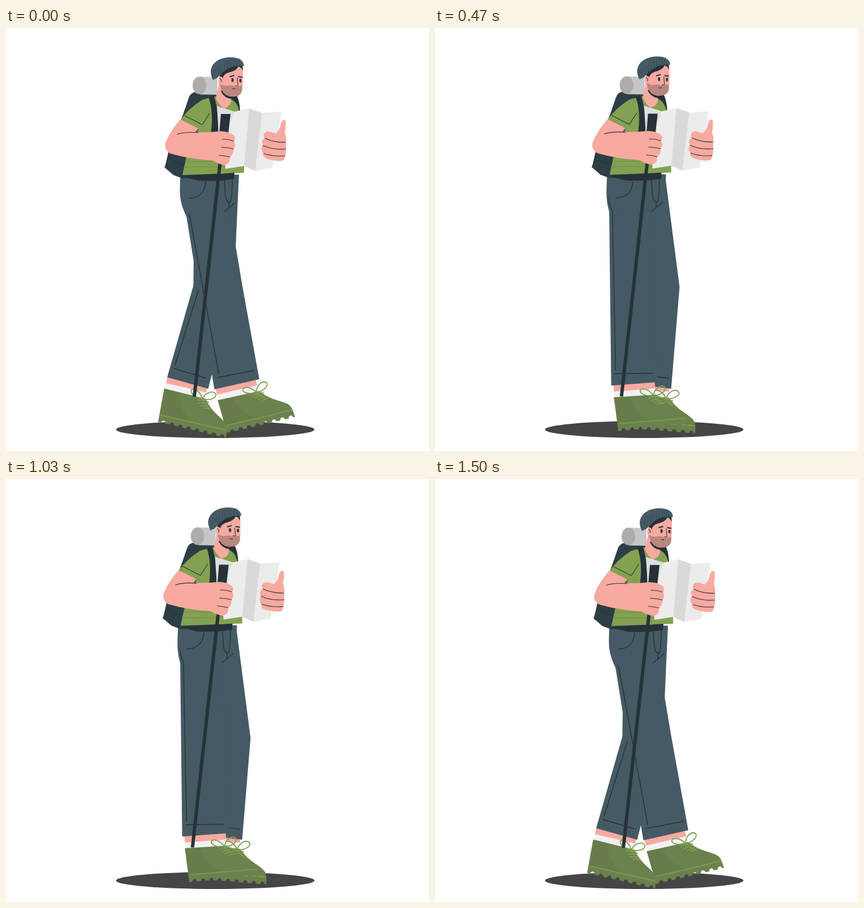
Animation of 748x748 px, one loop 1560 ms. Source, as an HTML page:

```html
<!DOCTYPE html>
<html lang="en">
<head>
<meta charset="utf-8">
<title>Hiker</title>
<style>
html, body { margin: 0; width: 100%; height: 100%; overflow: hidden; background: #fff; }
svg { display: block; width: 100vw; height: 100vh; }
.ink { fill: none; stroke: #263238; stroke-width: 1.4; stroke-linecap: round; stroke-linejoin: round; }
.thin { stroke-width: 1.1; }
.lace { fill: none; stroke: #7d9d50; stroke-width: 1.8; stroke-linecap: round; stroke-linejoin: round; }
.dark { fill: #263238; }
.skin { fill: #f8a9a0; }
.pants { fill: #455a64; stroke: #455a64; stroke-width: 1.5; stroke-linejoin: round; }
.hat { fill: #455a64; }
.shirt { fill: #83a151; }
</style>
</head>
<body>
<svg viewBox="0 0 748 748">
  <defs>
    <g id="boot">
      <path class="skin" d="M-2,-92H71V-68H-2Z"/>
      <path fill="#f1f1f1" d="M-2,-70H71V-56H-2Z"/>
      <path id="shoe" fill="#6b814e"/>
      <path fill="#5f7442" opacity=".35" d="M-3,-60L24,-59Q30,-30 58,-13L0,-12Z"/>
      <path class="lace" d="M2,-13H90Q108,-14 121,-13"/>
      <path class="lace" d="M58,-53l13,-3M62,-49l14,-3M67,-45l14,-3M73,-42l13,-2M66,-56l16,14"/>
      <path class="lace" d="M67,-57C50,-57 40,-66 46,-70C54,-73 63,-65 67,-57C69,-70 82,-77 88,-71C92,-65 80,-57 67,-57l12,3"/>
    </g>
  </defs>
  <rect width="748" height="748" fill="#fff"/>
  <ellipse cx="370" cy="710" rx="175.5" ry="15" fill="#454545"/>

  <use id="farBoot" href="#boot"/>
  <path id="farLeg" class="pants"/>
  <path id="farSeam" class="ink"/>
  <use id="nearBoot" href="#boot"/>
  <path id="nearLeg" class="pants"/>
  <path id="nearSeam" class="ink"/>

  <g id="body">
    <path class="pants" d="M310,260L411,260L409,298L394,318L320,328Q309,300 309,285Z"/>
    <path class="ink" d="M353,272C352,291 341,300 324,301M386,270L388,298Q390,308 396,308Q400,304 400,266M394,308V318M405,309L386,325"/>

    <path fill="#2d3e46" d="M323,124Q326,114 336,113L375,116L376,262L312,266L296,260L281,247L287,220L313,153Z"/>
    <path class="dark" d="M404,112Q413,124 414,148L398,142L396,118Z"/>
    <path class="ink thin" d="M288,226L296,237L314,241M281,247L288,226"/>
    <path fill="#c6c6c6" d="M343,86L374,87V118L343,117.5Z"/>
    <ellipse cx="342" cy="101.5" rx="12" ry="15.5" fill="#acacac"/>

    <path class="shirt" d="M369,121L398,126Q410,131 413,150L421,246V256L312,260L319,228L341,177L310,161Q322,143 347,127Z"/>
    <path stroke="#708e40" stroke-width="2" d="M317,236L392,236M314,246L400,245" opacity=".5"/>
    <path class="dark" d="M310,262L404,256L403,267Q375,272 340,270Z"/>
    <path class="dark" d="M358,122L368,120Q377,150 375,188L362,188Q368,150 358,122Z"/>

    <g id="head">
      <path class="skin" d="M377,98L371,124Q377,138 385,142Q395,140 398,130L397,112Z"/>
      <path class="dark" d="M380,112Q388,127 402,125L410,119L385,107Z"/>
      <path class="skin" d="M376,88Q378,74 394,68L418,68Q420,86 418,105L384,112Q373,103 376,88Z"/>
      <path fill="#ba8680" d="M379,99Q386,103 391,102Q400,100 405,104L417,102Q420,113 412,119Q398,125 387,117Q379,110 379,99Z"/>
      <path class="dark" d="M379,90L378,81Q392,66 418,65L419,77Q417,70 411,68Q407,76 393,79Q384,82 383,90Z"/>
      <ellipse class="skin" cx="380" cy="92" rx="3.8" ry="6"/>
      <path class="ink thin" d="M378,89Q382,91 380,95"/>
      <ellipse class="dark" cx="400.5" cy="92" rx="2" ry="3.4"/>
      <ellipse class="dark" cx="414.5" cy="93" rx="1.9" ry="3.3"/>
      <path class="ink" style="stroke-width:2" d="M396,86L403,84M411,86L417,87"/>
      <path class="ink thin" d="M409,88L410,102L405,102.5M400,107Q403,108.5 405,107"/>
      <path class="hat" d="M366,92Q360,80 363,71Q369,55 391,52Q419,50 421,67L418,67Q399,65 385,77Q378,83 374,88Z"/>
      <path id="ribs" class="ink" style="stroke-width:.8" opacity=".45"/>
    </g>

    <path fill="#dedede" d="M373,138L405,148L398,190L376,186Z"/>
    <path fill="#ececec" d="M404,148L430,142L421,244L388,249L384,200Z"/>
    <path fill="#d9d9d9" d="M430,142L453,150L441,253L421,244Z"/>
    <path fill="#ebebeb" d="M453,150L487,148L471,247L441,253Z"/>

    <path class="dark" d="M380,152H397L393,188H377Z"/>
    <path d="M380,225L333,652" stroke="#263238" stroke-width="6"/>

    <path class="skin" d="M309,161L341,177L335,184Q355,185 374,183Q390,181 402,189Q408,195 403,200Q408,208 402,214Q403,223 396,228Q397,241 386,242Q376,241 364,234Q325,232 291,222Q279,216 282,203Q291,181 309,161Z"/>
    <path class="shirt" d="M311,158L344,172L341,178L309,162Z"/>
    <path class="ink thin" d="M316,155L347,171L360,151"/>
    <path class="ink thin" d="M303,188Q315,183 340,185M382,197Q392,196 402,200M381,211Q392,211 402,214M377,225Q388,226 396,228"/>

    <path class="skin" d="M472,189Q483,185 486,169Q489,161 494,163Q496,171 493,185Q497,195 495,208Q496,225 491,234Q480,237 461,231Q453,228 455,222Q449,214 454,207Q450,199 457,195Q453,186 462,183Q470,183 479,188Z"/>
    <path class="ink thin" d="M458,195Q475,203 494,202M455,208Q472,216 495,214M456,222Q474,228 493,226"/>
  </g>
</svg>
<script>
const LOOP = 1560, STEP = 100 / 3, LAST = 45;
const $ = id => document.getElementById(id);
const line = (...pts) => 'M' + pts.map(p => p.map(v => v.toFixed(2)).join()).join('L');
const off = ([x, y], dx, dy) => [x + dx, y + dy];
const draw = (id, d) => $(id).setAttribute('d', d);
const move = (id, t) => $(id).setAttribute('transform', t);

draw('shoe', 'M-3,-60L72,-59Q83,-45 99,-36Q114,-28 119,-22Q123,-16 123,0'
  + 'h-3a4,4.5 0 0 0 -8,0h-4.2'.repeat(8) + 'L0,0Z');

let ribs = '';
for (let i = 0; i < 10; i++) {
  const x = 366 + i * 5.2, y = 87 - 21 * Math.sin(i / 9 * 1.5);
  ribs += `M${x},${y}q-2,-7 ${2 - i * .2},-13`;
}
draw('ribs', ribs);

// j runs from 0 (near foot forward) to 22 (near foot back)
function pose(j) {
  const k = j / 21, tilt = 13.2 - .62 * j;

  const farL = [286 + 4 * j, 617 + .76 * j], farR = [357 + 4.28 * j, 637];
  const farKnee = [332 + 1.95 * j, 456];
  draw('farLeg', line([335, 264], [411 - .33 * j, 262], [402.3 + 2.1 * j, 458], farR, farL, farKnee) + 'Z');
  draw('farSeam', line(off(farKnee, 3, -51), off(farKnee, 10, 2), off(farL, 13, -21))
    + line(off(farL, 11, -15), off(farR, -3, -18)));
  move('farBoot', `translate(${269 + 4.9 * j} ${696.5 + .76 * j}) rotate(${tilt})`);

  const nearL = [369 - 4.05 * j, 638 - .46 * j], nearR = [447 - 3.9 * j, 620.5 + .36 * j];
  const hip = 309 - .29 * j, side = [320 - .8 * j, 334 - .6 * j];
  draw('nearLeg', `M${hip},264C${hip - 2},296 ${hip - 1},309 ${side}L${nearL}L${nearR}`
    + `L${417 - 2.1 * j},455L${393 - .8 * j},312L${393 - .8 * j},264Z`);
  draw('nearSeam', `M${hip + 5},268C${hip},300 ${hip + 3},310 ${off(side, 5, -1)}L${off(nearL, 7, -27)}`
    + line(off(nearL, 5, -20), off(nearR, -8, -15)));
  move('nearBoot', `translate(${391 - 4.78 * j} ${716 - .24 * j}) rotate(${-tilt})`);

  move('body', `translate(${-4.9 * k} ${-.8 * k})`);
  move('head', `translate(${-.6 * k} ${-1.1 * k}) rotate(${-1.7 * k} 385 125)`);
}

function show(t) {
  const i = Math.floor((t % LOOP + 3.4) / STEP);
  pose(Math.max(0, Math.min(i, LAST - i)));
}

const start = performance.now();
function tick() {
  show(performance.now() - start);
  requestAnimationFrame(tick);
}
show(0);
requestAnimationFrame(tick);
</script>
</body>
</html>
```
